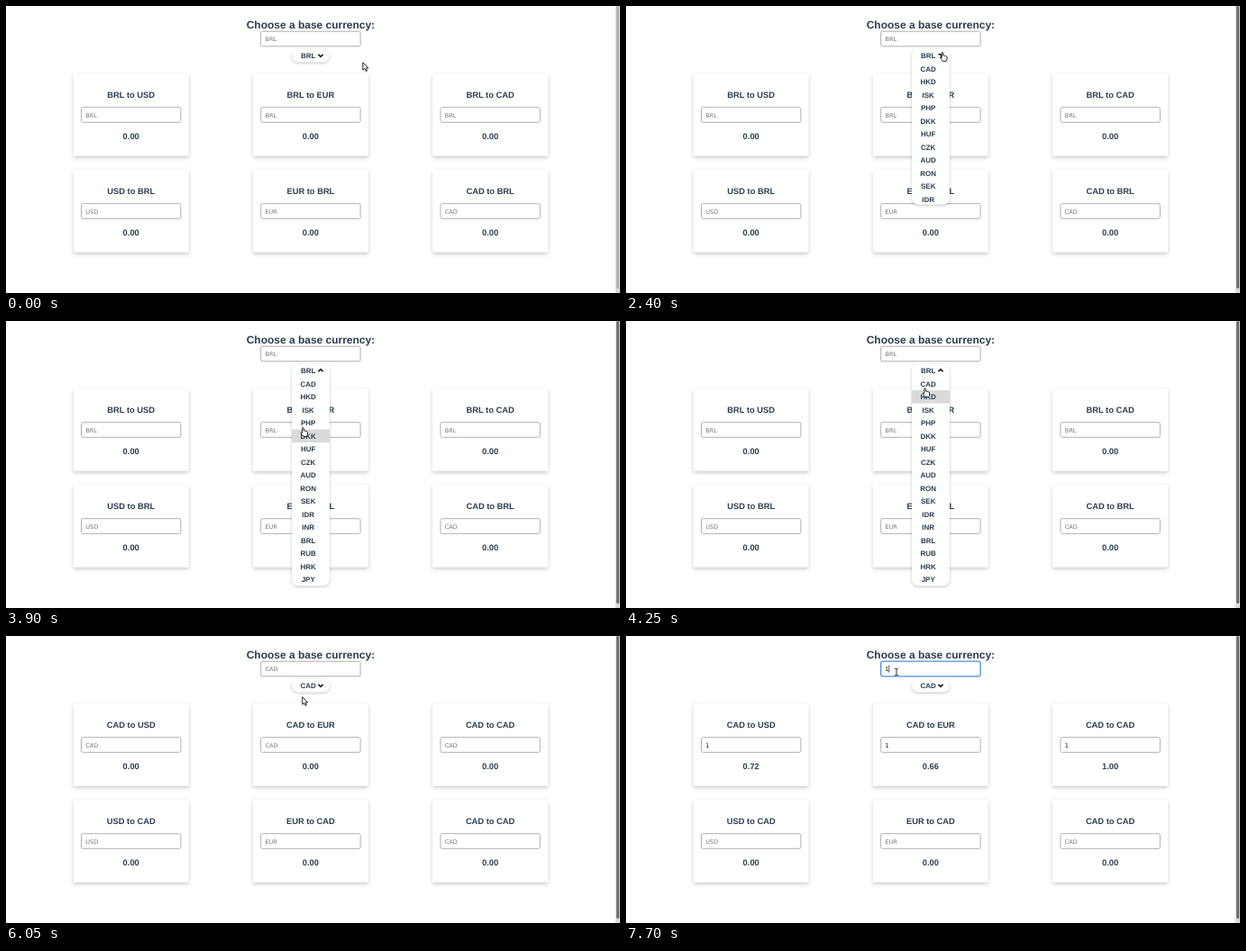
Write an HTML page that moves like this. It is 681 by 319 pixels and loops after 8 s.

```html
<!DOCTYPE html>
<html lang="en">
<head>
<meta charset="utf-8">
<title>Currency converter</title>
<style>
  html, body { margin: 0; width: 100%; height: 100%; overflow: hidden; background: #fff; }
  svg { display: block; width: 681px; height: 319px; }
  text { font-family: "Liberation Sans", Arial, sans-serif; font-weight: bold; fill: #2c3e50; text-anchor: middle; text-rendering: geometricPrecision; }
  .field { font-family: "DejaVu Sans", sans-serif; font-weight: normal; fill: #757575; text-anchor: start; }
  .field.typed { fill: #111; }
  .input { fill: #fff; stroke: #b0b0b0; stroke-width: 1; }
  .input.focus { stroke: #4a90d9; stroke-width: 1.3; }
  .card { fill: #fff; filter: drop-shadow(0 2px 2px rgba(0, 0, 0, .2)); }
  .menu { fill: #fff; filter: drop-shadow(0 1.5px 1.8px rgba(0, 0, 0, .24)); }
  .pointer { fill: #fff; stroke: #111; stroke-width: .9; stroke-linejoin: round; }
</style>
</head>
<body>
<script>
const LOOP = 8000, STEP = 50;
const MENU = { x: 317, y: 48, w: 42, row: 14.5 };
const CODES = 'CAD HKD ISK PHP DKK HUF CZK AUD RON SEK IDR INR BRL RUB HRK JPY'.split(' ');
const OPEN_AT = 2280, PICK_AT = 4795, FADE = 300, FOCUS_AT = 7400, TYPE_AT = 7700;

// Pointer moves: start, end, x, y
const START = [395, 62];
const MOVES = [
  [0, 50, 395.5, 62], [150, 200, 396, 62], [500, 650, 397.5, 61],
  [750, 1250, 375.5, 51], [1400, 1750, 348, 51], [2800, 3650, 326, 126],
  [3750, 4400, 329, 66], [6000, 6550, 283, 103], [6800, 7400, 300, 40]
];

function add(parent, name, attrs = {}) {
  const node = document.createElementNS('http://www.w3.org/2000/svg', name);
  set(node, attrs);
  return parent.appendChild(node);
}
function set(node, attrs) {
  for (const key in attrs) node.setAttribute(key, attrs[key]);
}
const rect = (parent, x, y, width, height, attrs) =>
  add(parent, 'rect', { x, y, width, height, ...attrs });

// y is the middle of the capitals
function label(parent, x, y, size, content = '', cls = '') {
  const node = add(parent, 'text', { x, y: y + size * .36, 'font-size': size, class: cls });
  node.textContent = content;
  return node;
}
function input(cx, cy) {
  const box = rect(svg, cx - 55.2, cy - 8.3, 110.4, 16.6, { rx: 1.8, class: 'input' });
  return { box, text: label(svg, cx - 50.4, cy + .2, 6.5, '', 'field') };
}
function fill(field, placeholder, value) {
  field.text.textContent = value || placeholder;
  field.text.classList.toggle('typed', !!value);
}

const svg = add(document.body, 'svg', { viewBox: '0 0 681 319' });
const CENTER = 337.9;
label(svg, CENTER, 21, 11.97, 'Choose a base currency:');
const baseField = input(CENTER, 36.5);
const caret = rect(svg, 291.3, 32.5, .7, 8, { fill: '#111' });

const cards = [];
for (const row of [0, 1]) {
  ['USD', 'EUR', 'CAD'].forEach((code, col) => {
    const cx = CENTER + (col - 1) * 199.2, y = 74.8 + row * 107;
    rect(svg, cx - 64, y, 128, 92, { rx: 1.5, class: 'card' });
    cards.push({
      row, code,
      title: label(svg, cx, y + 23.4, 9.33),
      field: input(cx, y + 46.2),
      result: label(svg, cx, y + 69.5, 9.33),
      rate: ['0.72', '0.66', '1.00'][col]
    });
  });
}

const clip = add(add(svg, 'defs'), 'clipPath', { id: 'menuClip' });
const menuRect = parent => rect(parent, MENU.x, MENU.y, MENU.w, MENU.row, { rx: 7.25 });
const menuShapes = [menuRect(svg), menuRect(clip)];
menuShapes[0].setAttribute('class', 'menu');
const list = add(svg, 'g', { 'clip-path': 'url(#menuClip)' });
const hover = rect(list, MENU.x, 0, MENU.w, MENU.row, { fill: '#dadada' });
const chosen = label(list, 335.2, 55.2, 7.98);
CODES.forEach((code, i) => label(list, 335.2, 55.2 + (i + 1) * MENU.row, 7.98, code));
const chevron = add(list, 'path', {
  d: 'M-2.6-1.3L0 1.3L2.6-1.3', fill: 'none', stroke: '#111', 'stroke-width': 1.6
});

rect(svg, 676, 0, 5, 319, { fill: '#dadada' });
const thumb = rect(svg, 677, 0, 3.2, 314, { rx: 1.5 });

const pointers = {
  arrow: 'M.8.8V9.2L2.7 7.5L4.2 10.6L5.5 10L4.1 7H6.8Z',
  hand: 'M2.2 6.5V1.3Q2.2.5 3 .5T3.8 1.3V4Q5 3.6 5.4 4.4Q6.5 4 6.8 4.8Q8 4.6 8 5.8V8Q8 9 7.3 10.4H3.4Q2.6 8.8.6 7Q.2 6 1.2 5.9Z',
  beam: 'M-2-3.8Q0-3.8 0-2.8Q0-3.8 2-3.8M0-2.8V2.8M-2 3.8Q0 3.8 0 2.8Q0 3.8 2 3.8'
};
for (const kind in pointers) {
  pointers[kind] = add(svg, 'path', { d: pointers[kind], class: 'pointer' });
}

const clamp = v => Math.min(1, Math.max(0, v));
const smooth = u => u * u * (3 - 2 * u);

// CSS "ease": cubic-bezier(.25, .1, .25, 1)
function ease(x) {
  if (x <= 0 || x >= 1) return clamp(x);
  const curve = (a, b, u) => 3 * a * u * (1 - u) ** 2 + 3 * b * u * u * (1 - u) + u ** 3;
  let lo = 0, hi = 1;
  for (let i = 0; i < 20; i++) {
    const mid = (lo + hi) / 2;
    if (curve(.25, .25, mid) < x) lo = mid; else hi = mid;
  }
  return curve(.1, 1, lo);
}

function pointerAt(t) {
  let [x, y] = START;
  for (const [from, to, nx, ny] of MOVES) {
    const p = smooth(clamp((t - from) / (to - from)));
    x += (nx - x) * p;
    y += (ny - y) * p;
  }
  return [x, y];
}

function render(t) {
  const base = t < PICK_AT ? 'BRL' : 'CAD';
  const typed = t >= TYPE_AT ? '1' : '';
  const focused = t >= FOCUS_AT;
  const open = ease((t - OPEN_AT) / FADE) - ease((t - PICK_AT) / FADE);
  const height = MENU.row * (1 + CODES.length * open);
  const [x, y] = pointerAt(t);

  fill(baseField, base, typed);
  baseField.box.classList.toggle('focus', focused);
  set(caret, { x: typed ? 291.4 : 287.4, opacity: focused ? 1 : 0 });
  for (const card of cards) {
    const [from, to] = card.row ? [card.code, base] : [base, card.code];
    const live = typed && !card.row;
    card.title.textContent = `${from} to ${to}`;
    fill(card.field, from, live ? typed : '');
    card.result.textContent = live ? card.rate : '0.00';
  }

  menuShapes.forEach(shape => set(shape, { height }));
  chosen.textContent = base;
  chevron.setAttribute('transform', `translate(349 55) rotate(${-180 * open})`);
  const row = Math.floor((y + 3 - MENU.y) / MENU.row);
  set(hover, { y: MENU.y + row * MENU.row, opacity: open > 0 && row > 0 ? 1 : 0 });
  thumb.setAttribute('fill', t < 2100 ? '#b4b4b4' : '#707070');

  const overMenu = x >= MENU.x && x < MENU.x + MENU.w && y >= MENU.y && y < MENU.y + height;
  const overInput = x > 283 && x < 393 && y > 28 && y < 45;
  const kind = overMenu ? 'hand' : overInput ? 'beam' : 'arrow';
  for (const name in pointers) {
    set(pointers[name], {
      transform: `translate(${x} ${y})`,
      display: name === kind ? 'inline' : 'none'
    });
  }
}

const began = performance.now();
function tick() {
  const t = (performance.now() - began) % LOOP;
  render(Math.floor(t / STEP) * STEP);
  requestAnimationFrame(tick);
}
tick();
</script>
</body>
</html>
```
